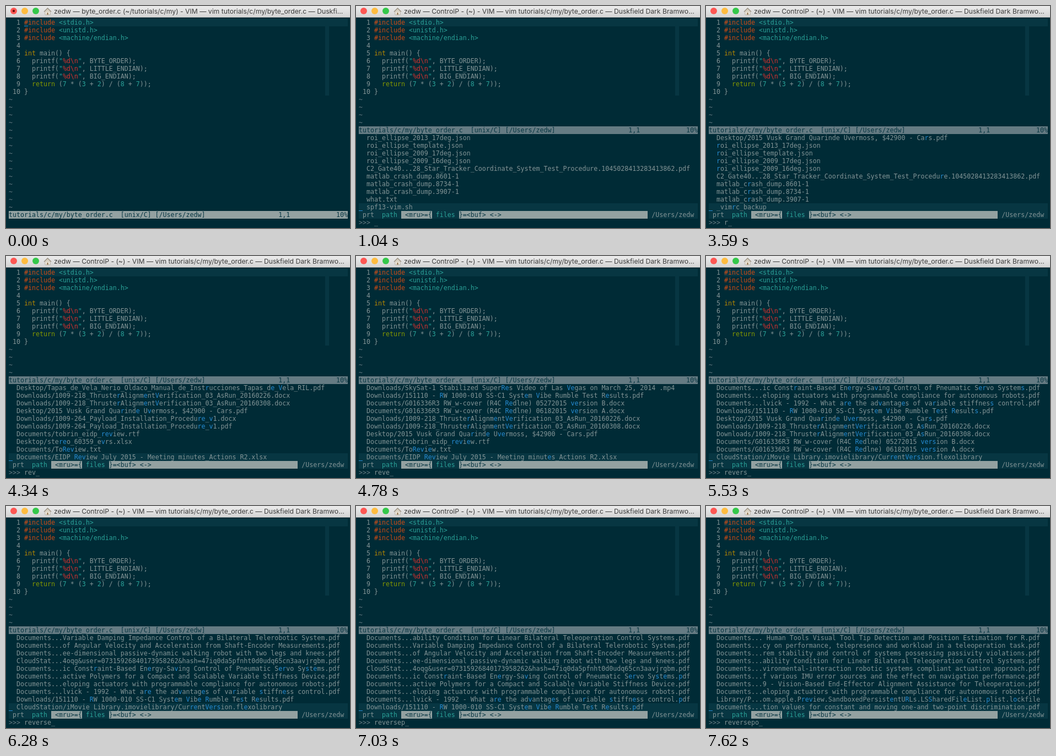
An HTML page that plays this animation: 624 by 404 pixels, repeating every 8 s.

```html
<!DOCTYPE html>
<html lang="en">
<head>
<meta charset="utf-8">
<title>Fuzzy file finder</title>
<style>
  html, body { margin: 0; width: 100%; height: 100%; overflow: hidden; background: #002b36; }
  #bar { position: absolute; left: 0; top: 0; width: 624px; height: 21px; overflow: hidden;
    background: linear-gradient(#ebebeb, #d3d3d3); box-shadow: inset 0 -1px #b4b4b4; }
  #bar svg { position: absolute; left: 0; top: 0; }
  #title { position: absolute; left: 87px; top: 0; line-height: 19px; white-space: pre;
    font: 12.2px/19px Inter, Roboto, sans-serif; color: #3c3c3c; }
  /* 11.627px gives a 7px wide character cell */
  #screen { position: absolute; left: 5px; top: 23px; width: 616px; white-space: pre;
    font: 11.627px/14px "DejaVu Sans Mono", monospace; color: #839496; }
  #screen div { height: 14px; }
  #screen span { display: inline-block; height: 14px; vertical-align: top; }
  #column { position: absolute; left: 579px; top: 37px; width: 7px; height: 126px; background: #073642; }
  #cursor { position: absolute; width: 7px; height: 1px; background: #268bd2; }
  .dim { color: #657b83; }
  .orange { color: #cb4b16; }
  .cyan { color: #2aa198; }
  .yellow { color: #b58900; }
  .green { color: #859900; }
  .red { color: #dc322f; }
  .blue { color: #268bd2; }
  .line { background: #073642; }
  .active { background: #93a1a1; color: #073642; }
  .inactive { background: #657b83; color: #073642; }
</style>
</head>
<body>
<div id="bar">
  <svg width="86" height="21">
    <circle cx="14" cy="9" r="6" fill="#fc5753"/>
    <circle id="dot" cx="14" cy="9" r="2.2" fill="#6d0c0a"/>
    <circle cx="34" cy="9" r="6" fill="#fdbc40"/>
    <circle cx="54" cy="9" r="6" fill="#34c84a"/>
    <path d="M71 10h9v6h-9z" fill="#f1ece0" stroke="#aaa294" stroke-width=".8"/>
    <path d="M69 10.5L75.5 4l6.500 6.500" fill="#d8d0c0" stroke="#988f83" stroke-width="1.300"/>
    <path d="M74 12h3v4h-3z" fill="#a58e70"/>
  </svg>
  <div id="title"></div>
</div>
<div id="column"></div>
<div id="screen"></div>
<div id="cursor"></div>
<script>
const LOOP = 8000, COLUMNS = 88, USER = 'zedw';
const byId = id => document.getElementById(id);
const escapeHtml = s => s.replace(/&/g, '&amp;').replace(/</g, '&lt;');
const span = (cls, html) => `<span class="${cls}">${html}</span>`;

const source = String.raw`#include <stdio.h>
#include <unistd.h>
#include <machine/endian.h>

int main() {
  printf("%d\n", BYTE_ORDER);
  printf("%d\n", LITTLE_ENDIAN);
  printf("%d\n", BIG_ENDIAN);
  return (7 * (3 + 2) / (8 + 7));
}`.split('\n');

const tokenColors = { '#include': 'orange', int: 'yellow', return: 'green', '%d\\n': 'red' };
const colorCode = line => line.replace(/#include|<\S+>|\bint\b|return|%d\\n|"|\b\d\b/g,
  token => span(tokenColors[token] || 'cyan', escapeHtml(token)));

// File names
const paper = name => `Documents...${name}.pdf`;
const roi = ['2013_17deg', 'template', '2009_17deg', '2009_16deg'].map(s => `roi_ellipse_${s}.json`);
const tracker = 'C2_Gate40...28_Star_Tracker_Coordinate_System_Test_Procedure.1045028413283413862.pdf';
const dumps = [8601, 8734, 3907].map(n => `matlab_crash_dump.${n}-1`);
const car = 'Desktop/2015 Vusk Grand Quarinde Uvermoss, $42900 - Cars.pdf';
const manual = 'Desktop/Tapas_de_Vela_Nerio_Oldaco_Manual_de_Instrucciones_Tapas_de_Vela_RIL.pdf';
const thrusters = ['0226', '0308'].map(d =>
  `Downloads/1009-218_ThrusterAlignmentVerification_03_AsRun_2016${d}.docx`);
const payloads = ['docx', 'pdf'].map(ext => `Downloads/1009-264_Payload_Installation_Procedure_v1.${ext}`);
const review = 'Documents/tobrin_eidp_review.rtf';
const stereo = 'Desktop/stereo_60359_evrs.xlsx';
const toReview = 'Documents/ToReview.txt';
const meeting = 'Documents/EIDP Review July 2015 - Meeting minutes_Actions R2.xlsx';
const network = 'Downloads/iron_crow_network_ssc_9ba6de22_dict_v4.1.1294-dev-f055b355-1680.tar.bz2';
const video = 'Downloads/SkySat-1 Stabilized SuperRes Video of Las Vegas on March 25, 2014 .mp4';
const rumble = 'Downloads/151110 - RW 1000-010 SS-C1 System Vibe Rumble Test Results.pdf';
const covers = ['05272015 version B', '06182015 version A'].map(s =>
  `Documents/G016336R3 RW_w-cover (R4C Redlne) ${s}.docx`);
const library = 'CloudStation/iMovie Library.imovielibrary/CurrentVersion.flexolibrary';
const servo = paper('ic Constraint-Based Energy-Saving Control of Pneumatic Servo Systems');
const robots = paper('eloping actuators with programmable compliance for autonomous robots');
const stiffness = paper('lvick - 1992 - What are the advantages of variable stiffness control');
const bilateral = paper('ability Condition for Linear Bilateral Teleoperation Control Systems');
const mechanics = [
  paper('Variable Damping Impedance Control of a Bilateral Telerobotic System'),
  paper('of Angular Velocity and Acceleration from Shaft-Encoder Measurements'),
  paper('ee-dimensional passive-dynamic walking robot with two legs and knees'),
  'CloudStat...4oqg&user=07315926840173958262&hash=47iq0da5pfnht0d0udq65cn3aavjrgbm.pdf',
  servo,
  paper('active Polymers for a Compact and Scalable Variable Stiffness Device'),
  robots, stiffness, rumble
];

// Ten results per query, best match last
const results = {
  '': [...roi, tracker, ...dumps, 'what.txt', 'spf13-vim.sh'],
  r: [car, ...roi, tracker, ...dumps, '_vimrc_backup'],
  re: [...roi.slice(1), ...payloads, review, stereo, toReview, meeting, tracker],
  rev: [manual, ...thrusters, car, ...payloads, review, stereo, toReview, meeting],
  reve: [video, rumble, ...covers, ...thrusters, car, review, toReview, meeting],
  rever: [network, video, meeting, rumble, ...covers, ...thrusters, car, review],
  revers: [servo, robots, stiffness, rumble, car, ...thrusters, ...covers, library],
  reverse: [...mechanics, library],
  reversep: [bilateral, ...mechanics],
  reversepo: [
    paper(' Human Tools Visual Tool Tip Detection and Position Estimation for R'),
    paper('cy on performance, telepresence and workload in a teleoperation task'),
    paper('rem stability and control of systems possessing passivity violations'),
    bilateral,
    paper('vironmental-interaction robotic systems compliant actuation approach'),
    paper('f various IMU error sources and the effect on navigation performance'),
    paper('9 - Vision-Based End-Effector Alignment Assistance for Teleoperation'),
    robots,
    'Library/P...om.apple.Preview.SandboxedPersistentURLs.LSSharedFileList.plist.lockfile',
    paper('tion values for constant and moving one-and two-point discrimination')
  ]
};

const keyTimes = [3590, 4040, 4340, 4780, 5080, 5530, 6280, 7030, 7620];

// Each query letter marks its last possible place, or the one right after the previous letter.
function markMatches(name, query) {
  const marked = new Set();
  [...query].forEach((letter, i) => {
    const before = [...query.slice(0, i)].join('.*') + (i ? '(?:|.*)' : '');
    const rest = [...query.slice(i)].join('.*');
    const match = name.match(new RegExp(`^(.*${before})${rest}`, 'i'));
    if (match) marked.add(match[1].length);
  });
  return [...name].map((c, i) => marked.has(i) ? span('blue', c) : escapeHtml(c)).join('');
}

function statusLine(cls) {
  const left = `tutorials/c/my/byte_order.c  [unix/C] [/Users/${USER}]`;
  return span(cls, left.padEnd(70) + '1,1'.padEnd(15) + '10%');
}

function finderLine() {
  return span('line', ' prt  ' + span('cyan', 'path') + ' ') +
    span('active', ' &lt;mru>={') + span('line cyan', ' files ') +
    span('active', '}=&lt;buf> &lt;->'.padEnd(49 + 6)) + span('line', ` /Users/${USER} `);
}

function editorRows(count) {
  return Array.from({ length: count }, (_, i) => {
    if (i >= source.length) return span('dim', '~');
    const number = String(i + 1).padStart(3) + ' ';
    const code = colorCode(source[i]);
    const padding = ' '.repeat(COLUMNS - 4 - source[i].length);
    return number + (i ? code : span('line', code + padding));
  });
}

function finderRows(query, ready) {
  const files = results[query].map((name, i, all) => {
    const row = '  ' + markMatches(name, query);
    return i < all.length - 1 ? row : span('line', row + ' '.repeat(COLUMNS - 2 - name.length));
  });
  return [...editorRows(14), statusLine('inactive'), ...files, finderLine(),
    ready ? span('dim', '>>> ') + query + '_' : ''];
}

function render(open, ready, query) {
  const rows = open ? finderRows(query, ready) : [...editorRows(25), statusLine('active')];
  byId('screen').innerHTML = rows.map(row => `<div>${row}</div>`).join('');
  byId('title').textContent = `${USER} — ` +
    (open ? 'ControlP - (~)' : 'byte_order.c (~/tutorials/c/my)') +
    ' - VIM — vim tutorials/c/my/byte_order.c — ' +
    (open ? 'Duskfield Dark Bramwo...' : 'Duskfi...');
  byId('dot').style.display = open ? 'none' : '';
  const cursor = byId('cursor').style;
  cursor.display = open && !ready ? 'none' : '';
  cursor.left = open ? '5px' : '33px';
  cursor.top = open ? '372px' : '36px';
}

let shown;
function frame() {
  const time = performance.now() % LOOP;
  const typed = keyTimes.filter(t => t <= time).length;
  const state = [time >= 900, time >= 1040, 'reversepo'.slice(0, typed)];
  if (String(state) !== shown) {
    shown = String(state);
    render(...state);
  }
  requestAnimationFrame(frame);
}
frame();
</script>
</body>
</html>
```
